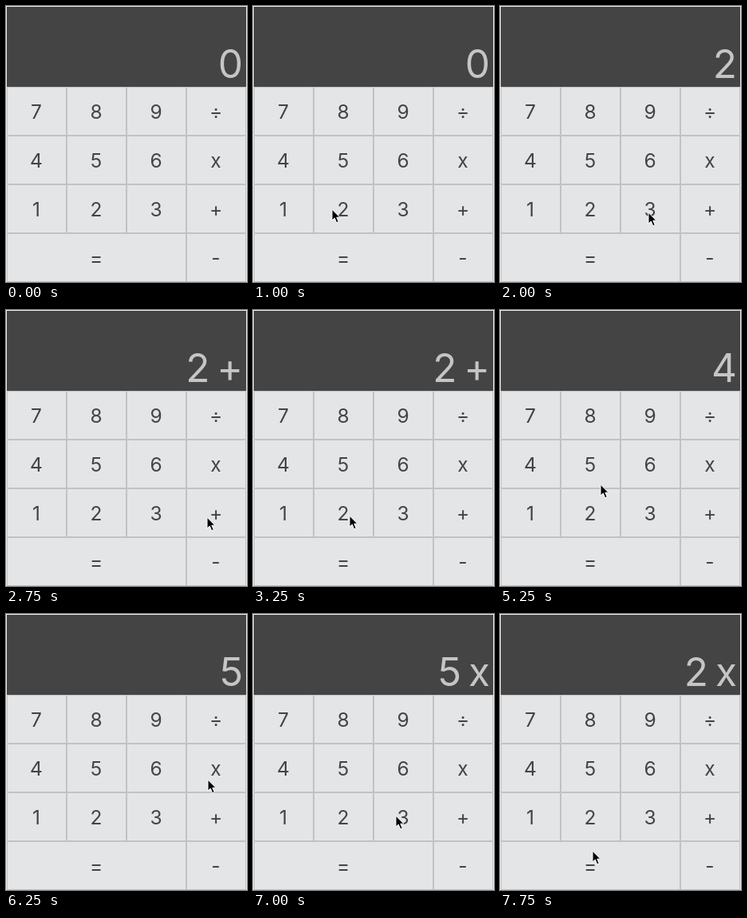
Animation of 302x345 px, one loop 8000 ms. Source, as an HTML page:

```html
<!DOCTYPE html>
<html lang="en">
<head>
<meta charset="utf-8">
<title>Calculator</title>
<style>
  html, body { margin: 0; width: 100%; height: 100%; overflow: hidden; background: #eee; }
  svg { display: block; }
  text { font-family: Inter, "Liberation Sans", sans-serif; }
  #keys rect { fill: #e4e5e7; stroke: #c1c2c4; }
  #keys text { font-size: 24.5px; fill: #444; text-anchor: middle; }
  #display { font-size: 49.5px; fill: #c5c5c5; text-anchor: end; word-spacing: -5px; }
</style>
</head>
<body>
<svg width="302" height="345" viewBox="0 0 302 345">
  <rect x="1" y="1" width="300" height="100" fill="#444"/>
  <text id="display" x="297" y="90"></text>
  <g id="keys"></g>
  <g id="cursor">
    <path d="M0 .3V14.1L3.3 11.1 5.7 16.8 8.2 15.7 5.8 10.2H9.9Z" stroke="#fff"/>
  </g>
</svg>
<script>
const LOOP = 8000, STEP = 250, ENTER = 500;
const $ = id => document.getElementById(id);

// Each visit ends in a key press. The hand travels for a while, then waits
// before pressing; pace bends its speed and bow bends its path.
const entry = { x: 54, y: 239 };
const visits = [
  { key: '2', press: 1750, x: 109, y: 257, pace: .3, travel: 1000 },
  { key: '+', press: 2750, x: 252, y: 259, pace: .9, wait: 500 },
  { key: '2', press: 3500, x: 121, y: 257, pace: .35 },
  { key: '=', press: 4250, x: 110, y: 330 },
  { key: '5', press: 5750, x: 118, y: 192, pace: .3, bow: .07 },
  { key: 'x', press: 6500, x: 253, y: 207, pace: 1.6 },
  { key: '2', press: 7500, x: 104, y: 246, pace: .9, bow: -.16 },
  { key: '=', press: 8250, x: 124, y: 330, pace: .74 }
];

function addKey(label, column, row, span = 1) {
  const x = 1 + column * 75, y = 101 + row * 61, width = span * 75;
  $('keys').insertAdjacentHTML('beforeend',
    `<rect x="${x + .5}" y="${y + .5}" width="${width - 1}" height="60"/>
     <text x="${x + width / 2 - .5}" y="${y + 40.3}">${label}</text>`);
}

['789÷', '456x', '123+'].forEach((labels, row) =>
  [...labels].forEach((label, column) => addKey(label, column, row)));
addKey('=', 0, 3, 3);
addKey('-', 3, 3);

const operations = {
  '+': (a, b) => a + b,
  '-': (a, b) => a - b,
  'x': (a, b) => a * b,
  '÷': (a, b) => a / b
};

function readout(time) {
  let number = 0, stored = 0, operator = '';
  for (const { key, press } of visits) {
    if (press > time) break;
    if (key === '=') {
      number = operations[operator](stored, number);
      operator = '';
    } else if (key in operations) {
      stored = number;
      operator = key;
    } else {
      number = Number(key);
    }
  }
  return `${number} ${operator}`.trim();
}

function pointerAt(time) {
  let { x, y } = entry;
  for (const { press, x: toX, y: toY, pace = 1, bow = 0, travel = 500, wait = 250 } of visits) {
    const t = Math.min((time - (press - wait - travel)) / travel, 1);
    if (t <= 0) break;
    const dx = toX - x, dy = toY - y;
    const along = t ** pace, aside = bow * Math.sin(Math.PI * t);
    x += dx * along - dy * aside;
    y += dy * along + dx * aside;
  }
  return [Math.round(x), Math.round(y)];
}

function draw(now) {
  const time = Math.floor(now % LOOP / STEP) * STEP;
  $('display').textContent = readout(time);
  $('cursor').setAttribute('visibility', time < ENTER ? 'hidden' : 'visible');
  $('cursor').setAttribute('transform', `translate(${pointerAt(time)})`);
}

const start = performance.now();
function tick() {
  draw(performance.now() - start);
  requestAnimationFrame(tick);
}
tick();
</script>
</body>
</html>
```
